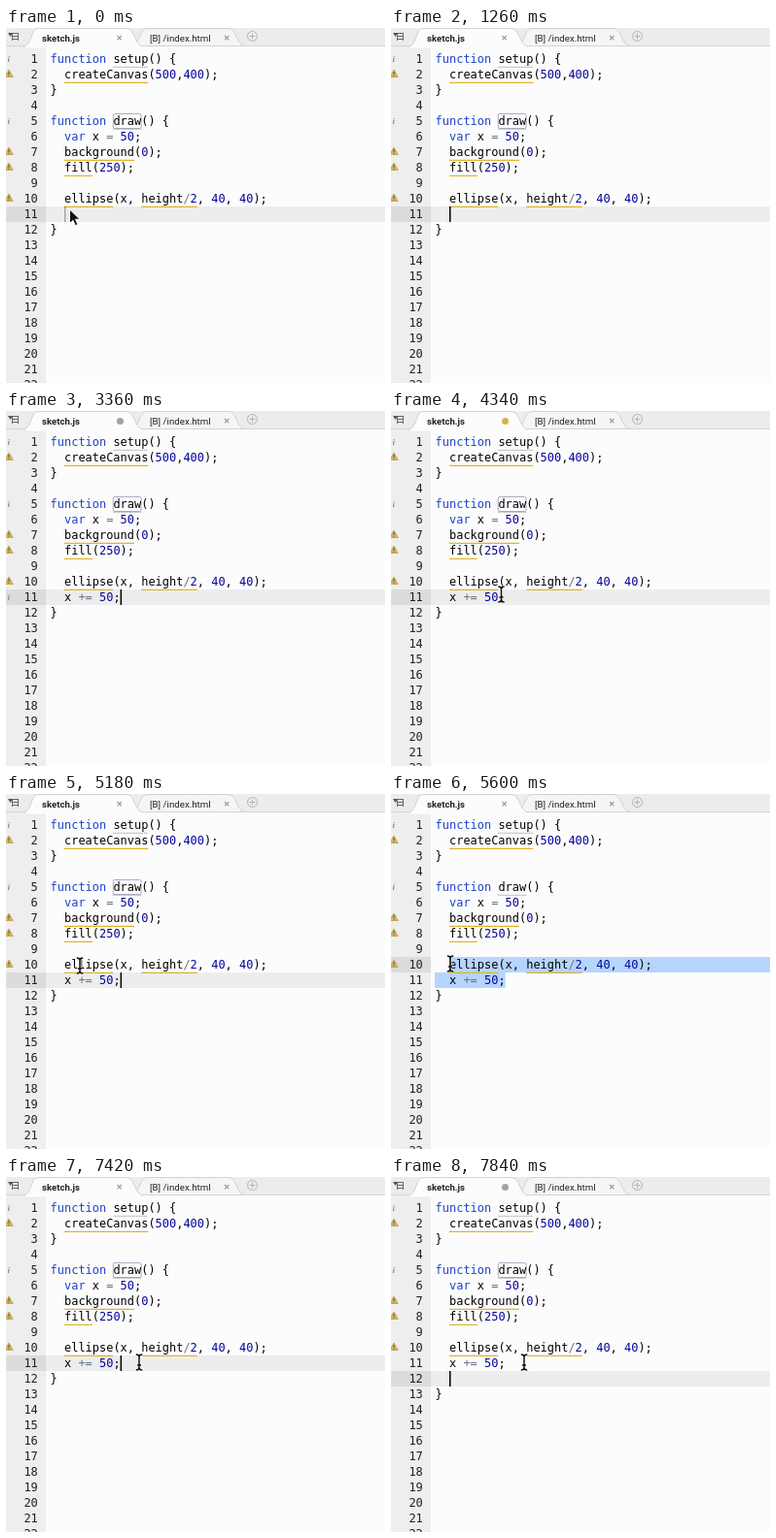
These frames come from a looping animation (390 px wide and 366 px high, 8000 ms). An HTML page:

```html
<!DOCTYPE html>
<html>
<head>
<meta charset="utf-8">
<style>
  html, body { margin: 0; height: 100%; overflow: hidden; background: #fcfcfc; }
  svg { display: block; width: 100vw; height: 100vh; }
  text { white-space: pre; }
  .code { font: 11.96px "DejaVu Sans Mono", monospace; }
  .tab { font: 9.7px Roboto, sans-serif; }
  .active { font-weight: 700; font-size: 9.6px; }
  .info { font: italic bold 9px "Liberation Serif", serif; }
</style>
</head>
<body>
<svg id="stage" viewBox="0 0 390 366"></svg>
<script>
const LOOP = 8000, STEP = 140;
const LEFT = 45.6, CHAR = 7.2, LINE = 16, GUTTER = 41;
const colX = col => LEFT + col * CHAR;
const rowY = row => 24 + (row - 1) * LINE;

const rect = (x, y, w, h, fill, extra = '') =>
  `<rect x="${x}" y="${y}" width="${w}" height="${h}" fill="${fill}" ${extra}/>`;
const path = (d, stroke, width = 1, extra = 'fill="none"') =>
  `<path d="${d}" stroke="${stroke}" stroke-width="${width}" ${extra}/>`;
const text = (x, y, s, cls, fill, extra = '') =>
  `<text x="${x}" y="${y}" class="${cls}" fill="${fill}" ${extra}>${s}</text>`;

const HEAD = [
  'function setup() {',
  '  createCanvas(500,400);',
  '}',
  '',
  'function draw() {',
  '  var x = 50;',
  '  background(0);',
  '  fill(250);',
  '',
  '  ellipse(x, height/2, 40, 40);'
];

// row, column, length
const WARNINGS = [[2, 2, 12], [7, 2, 10], [8, 2, 4], [10, 2, 7], [10, 13, 8]];
const HINTS = [[1, 9, 5], [5, 9, 4]];

const TYPING = [
  [0, ''], [1680, 'x'], [1820, 'x '], [2380, 'x +'], [2520, 'x += '],
  [2800, 'x += 5'], [2940, 'x += 50'], [3220, 'x += 50;']
];
const CURSOR_ALPHA = [
  [0, 0.3], [420, 1], [840, 0.3], [980, 0], [1260, 1], [4200, 0], [4760, 1]
];
const TAB_MARK = [
  [0, 'close'], [1680, '#a2a2a2'], [4200, '#d6b24a'], [4620, 'close'], [7840, '#a2a2a2']
];
const BEAM = [
  [4060, 84, 199], [4340, 113.5, 189], [4620, 118, 192], [4900, 116, 191],
  [5180, 76, 177], [5460, 61, 175], [6720, 61, 175], [6860, 108, 187], [7000, 137, 191]
];

const latest = (keys, t) => keys.filter(k => k[0] <= t).pop()[1];

function along(keys, t) {
  const next = keys.findIndex(k => k[0] > t);
  if (next < 0) return keys[keys.length - 1].slice(1);
  const a = keys[next - 1], b = keys[next];
  const p = (t - a[0]) / (b[0] - a[0]);
  return [1, 2].map(i => a[i] + (b[i] - a[i]) * p);
}

function tokenColor(token) {
  if (/^(function|var)$/.test(token)) return '#1f42c8';
  if (/^\d/.test(token)) return '#06069c';
  if (/^[=+\/]/.test(token)) return '#687687';
  return '#000';
}

function codeLine(source, row) {
  return [...source.matchAll(/function|var|\d+|[=+\/]+|[a-zA-Z]+|[^\sa-zA-Z\d=+\/]+/g)]
    .map(m => text(colX(m.index), rowY(row) + 12, m[0], 'code', tokenColor(m[0])))
    .join('');
}

const closeMark = x => path(`M${x - 2} 8l4.4 4.4m0 -4.4l-4.4 4.4`, '#999', 1.1);

function tabBar(mark) {
  return rect(0, 0, 390, 19, '#ececec') +
    path('M130 18.5C137 18 137 .5 145 .5H229C238 .5 237 18 246 18.5', '#d2d2d2', 1, 'fill="#f5f5f5"') +
    path('M0 18.5H390', '#d4d4d4') +
    path('M18 19C27 18 25 .5 33 .5H124C133 .5 132 18 141 19', '#d2d2d2', 1, 'fill="#fcfcfc"') +
    rect(20, 18.6, 119, 2, '#fcfcfc') +
    path('M6.5 5.5H13M7 8.5H13M7 11.5H13M6.5 5V13M12.5 5V13', '#666') +
    path('M2 5H7L4.5 9Z', 'none', 0, 'fill="#555"') +
    text(37, 14, 'sketch.js', 'tab active', '#222') +
    text(148, 14, '[B] /index.html', 'tab', '#222') +
    (mark === 'close' ? closeMark(116.5) : `<circle cx="117.5" cy="10.5" r="3.5" fill="${mark}"/>`) +
    closeMark(227) +
    '<circle cx="253.5" cy="8.5" r="5" fill="none" stroke="#b4b4b4"/>' +
    path('M250.5 8.5h6m-3 -3v6', '#b4b4b4');
}

function gutter(activeRow, infoRows) {
  let out = rect(0, 19, GUTTER, 347, '#eeeeee') +
    rect(0, rowY(activeRow), GUTTER, LINE, '#dcdcdc');
  for (let row = 1; row <= 22; row++)
    out += text(32.8, rowY(row) + 12, row, 'code', '#222', 'text-anchor="end"');
  for (const row of infoRows) out += text(1.5, rowY(row) + 11, 'i', 'info', '#8b8b8b');
  for (const row of new Set(WARNINGS.map(w => w[0]))) {
    const y = rowY(row);
    out += path(`M3 ${y + 3}L7.2 ${y + 10.5}H-1.2Z`, '#b99a55', 0.8, 'fill="#d9b765"') +
      path(`M3 ${y + 5}v2.8m0 .8v1.1`, '#5d4a20');
  }
  return out;
}

const underline = (color, extra) => ([row, col, len]) =>
  path(`M${colX(col)} ${rowY(row) + 16.4}h${len * CHAR}`, color, 1.2, extra);

const underlines = () =>
  WARNINGS.map(underline('#dcb52e')).join('') +
  HINTS.map(underline('#999', 'fill="none" stroke-dasharray="1 1"')).join('');

function beam(x, y) {
  const d = `M${x - 3.2} ${y - 8}q3.2 0 3.2 2.5v11q0 2.5 -3.2 2.5M${x + 3.2} ${y - 8}q-3.2 0 -3.2 2.5` +
    `m0 11q0 2.5 3.2 2.5M${x - 2} ${y + 3}h4`;
  return path(d, '#fff', 3.2, 'fill="none" opacity=".7"') + path(d, '#111', 1.5);
}

const arrow = (x, y) =>
  path(`M${x} ${y}v14.5l3.4 -3.2l2.4 5.4l2.6 -1.1l-2.4 -5.3h4.6Z`, '#fff', 1, 'fill="#111"');

function draw(time) {
  const t = Math.floor(time / STEP) * STEP;
  const typed = latest(TYPING, t);
  const selected = t >= 5320 && t < 7420;
  const newLine = t >= 7840;
  const activeRow = selected ? 10 : newLine ? 12 : 11;
  const lines = [...HEAD, '  ' + typed, ...(newLine ? ['', '}'] : ['}'])];

  let out = rect(0, 0, 390, 366, '#fcfcfc') +
    gutter(activeRow, t >= 1820 && t < 3640 ? [1, 5, 11] : [1, 5]);

  if (selected) {
    const start = colX(t < 5460 ? 3 : 2);
    out += rect(start, rowY(10), 390 - start, LINE, '#b5d5ff') +
      rect(45, rowY(11), colX(10) - 45, LINE, '#b5d5ff');
  } else {
    out += rect(GUTTER, rowY(activeRow), 390 - GUTTER, LINE, '#ededed') +
      rect(colX(9) - 0.1, rowY(5) + 0.5, 4 * CHAR, 15, 'none', 'stroke="#a9adc4" rx="1.5"');
  }

  out += underlines() + lines.map((line, i) => codeLine(line, i + 1)).join('');

  const cursorCol = selected || newLine ? 2 : 2 + typed.length;
  out += rect(colX(cursorCol), rowY(activeRow), 1.5, LINE, '#000',
    `opacity="${latest(CURSOR_ALPHA, t)}"`);

  out += tabBar(latest(TAB_MARK, t));
  if (t < 280) out += arrow(65.5, 187);
  if (t >= BEAM[0][0]) out += beam(...along(BEAM, t));
  return out;
}

const stage = document.getElementById('stage');
let shown = '';
function tick() {
  const markup = draw(performance.now() % LOOP);
  if (markup !== shown) stage.innerHTML = shown = markup;
  requestAnimationFrame(tick);
}
tick();
</script>
</body>
</html>
```
